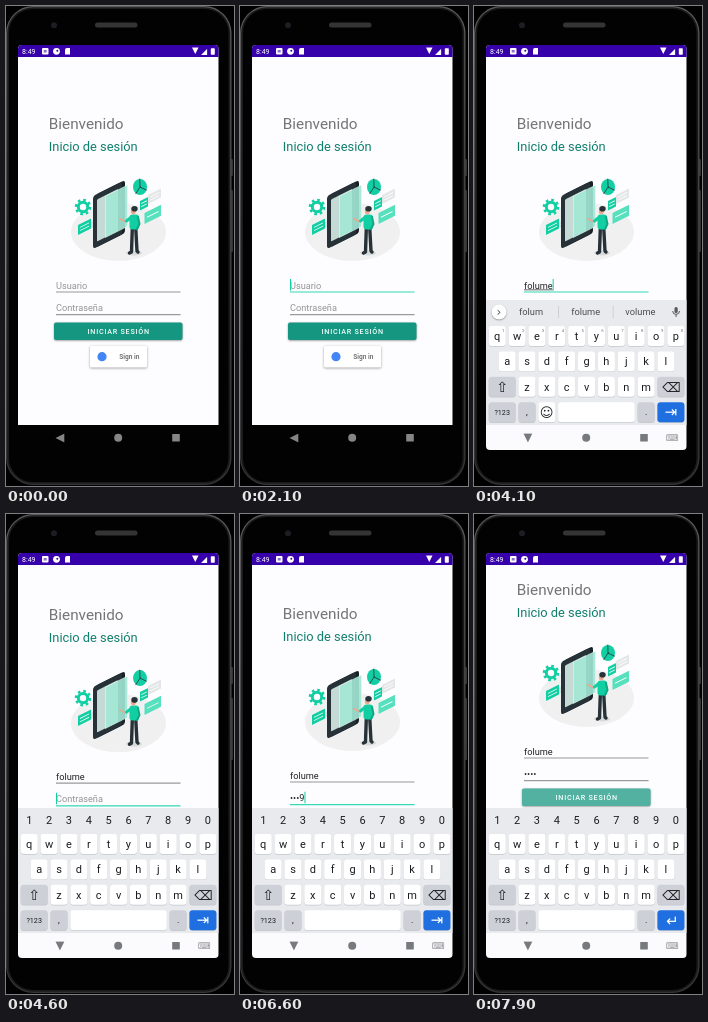
Recreate the animation shown at these times as an HTML page with a canvas. Size 228 px wide and 480 px high, loop 8000 ms.

```html
<!DOCTYPE html>
<html lang="es">
<head>
<meta charset="utf-8">
<title>Inicio de sesión</title>
<style>
html, body { margin: 0; width: 100%; height: 100%; overflow: hidden; background: #000; }
canvas { display: block; width: 100vw; height: 100vh; }
</style>
</head>
<body>
<canvas id="stage"></canvas>
<script>
const W = 228, H = 480, LOOP = 8000;
const canvas = document.getElementById('stage');
const ctx = canvas.getContext('2d');
const ratio = Math.max(1, window.devicePixelRatio || 1);
canvas.width = W * ratio;
canvas.height = H * ratio;

const TEAL = '#159680', MINT = '#12cfa3', PALE = '#d9f3ec', INK = '#263238', SKIN = '#e9a98d';
const KEY_INK = '#1b1d20', KEY_GREY = '#cdd1d7', KEY_BG = '#e8eaee', ICON = '#555a60';
const LEFT = 12, WIDTH = 200.7, STATUS_TOP = 39, APP_TOP = 51, NAV_TOP = 419, BOTTOM = 444;
const PITCH = 19.85, KEY_LEFT = 14.7, KEY_GAP = 2.8, KEYS_TOP = 294;
const USER = 'folume', PIN = '4789';

// Moments in ms
const FOCUS = 1700, SLIDE = 2500, NAV_SWAP = 3300, TYPE = 3400, TYPE_GAP = 115;
const NEXT = 4450, PIN_TYPE = 4950, PIN_GAP = 450, DONE = 6850;

const ease = v => 1 - (1 - Math.min(1, Math.max(0, v))) ** 3;
const typed = (t, start, gap, max) => Math.min(max, Math.max(0, Math.floor((t - start) / gap) + 1));
const userCount = t => typed(t, TYPE, TYPE_GAP, USER.length);
const pinCount = t => typed(t, PIN_TYPE, PIN_GAP, PIN.length);

function box(x, y, w, h, r, fill) {
  ctx.beginPath();
  ctx.roundRect(x, y, w, h, r);
  ctx.fillStyle = fill;
  ctx.fill();
}

function oval(x, y, rx, ry, fill) {
  ctx.beginPath();
  ctx.ellipse(x, y, rx, ry, 0, 0, 7);
  ctx.fillStyle = fill;
  ctx.fill();
}

function arc(x, y, r, color, width = 1, from = 0, to = 2 * Math.PI) {
  ctx.beginPath();
  ctx.arc(x, y, r, from, to);
  ctx.strokeStyle = color;
  ctx.lineWidth = width;
  ctx.stroke();
}

function limb(color, width, ...points) {
  ctx.beginPath();
  points.forEach(([x, y]) => ctx.lineTo(x, y));
  ctx.strokeStyle = color;
  ctx.lineWidth = width;
  ctx.lineCap = ctx.lineJoin = 'round';
  ctx.stroke();
}

function label(text, x, y, size, color, align = 'left', weight = 400, spacing = 0) {
  ctx.font = `${weight} ${size}px Roboto, sans-serif`;
  ctx.letterSpacing = spacing + 'px';
  ctx.textAlign = align;
  ctx.fillStyle = color;
  ctx.fillText(text, x, y);
  return ctx.measureText(text).width;
}

// Draws a symbol with its visible box centred on (x, y)
function glyph(symbol, x, y, size, color) {
  ctx.font = `${size}px "DejaVu Sans", sans-serif`;
  ctx.letterSpacing = '0px';
  ctx.textAlign = 'left';
  ctx.fillStyle = color;
  const m = ctx.measureText(symbol);
  ctx.fillText(symbol,
    x + (m.actualBoundingBoxLeft - m.actualBoundingBoxRight) / 2,
    y + (m.actualBoundingBoxAscent - m.actualBoundingBoxDescent) / 2);
}

function scoped(draw) {
  ctx.save();
  draw();
  ctx.restore();
}

function clipped(y, h, r, draw) {
  scoped(() => {
    ctx.beginPath();
    ctx.roundRect(LEFT, y, WIDTH, h, r);
    ctx.clip();
    draw();
  });
}

function shadowed(blur, draw) {
  scoped(() => {
    ctx.shadowColor = 'rgba(0,0,0,.4)';
    ctx.shadowBlur = blur * ratio;
    ctx.shadowOffsetY = ratio * .8;
    draw();
  });
}

// Upright isometric panel whose top edge rises to the right
function panel(x, y, w, h, fill, r = 0, rows = 0) {
  scoped(() => {
    ctx.transform(1, -.5, 0, 1, x, y);
    box(0, 0, w, h, r, fill);
    for (let i = 1; i <= rows; i++) box(w * .15, h * i / (rows + 1) - .4, w * .7, .8, 0, '#fff');
  });
}

function drawBody() {
  ctx.fillStyle = '#000';
  ctx.fillRect(0, 0, W, H);
  box(224, 153, 3, 17, 1, '#333');
  box(224, 184, 3, 62, 1, '#333');
  const rim = ctx.createLinearGradient(0, 0, 0, H);
  rim.addColorStop(0, '#5a5a5d');
  rim.addColorStop(1, '#343436');
  box(0, 0, 225.5, 479, 27, rim);
  box(1.2, 1.2, 223, 476.5, 26, '#1b1b1c');
  box(3, 3, 219.5, 473, 24, '#020202');
  box(89, 16.5, 42.5, 5, 2.5, '#343434');
  oval(48, 19.3, 3, 3, '#1d1d24');
}

function drawStatusBar() {
  box(LEFT, STATUS_TOP, WIDTH, APP_TOP - STATUS_TOP, 0, '#3600aa');
  label('8:49', 16, 48, 7, '#fff');
  box(36, 42, 6.5, 6.5, 1, '#fff');
  box(37.7, 44, 3, 2.5, 0, '#8c6fd0');
  oval(50.5, 45.3, 3.4, 3.4, '#fff');
  box(50.3, 43.7, 2, 2, 1, '#3600aa');
  box(59, 42, 5, 6.5, [2, 0, 0, 0], '#fff');
  glyph('▼', 189.5, 45.3, 8.5, '#fff');
  glyph('◢', 198.5, 45.3, 8, '#fff');
  box(204.8, 42.2, 4, 6.5, .7, '#fff');
}

function drawIllustration() {
  oval(112.5, 226, 47.5, 29, '#f0f0f1');

  arc(77, 201, 4.7, MINT, 3);
  scoped(() => {
    ctx.setLineDash([2.6, 2.9]);
    arc(77, 201, 7, MINT, 2.6);
  });
  panel(72, 219, 13, 10, MINT, .5, 2);
  panel(85, 216, 10, 6, '#d9dddd', .5, 1);

  panel(90, 188.5, 29, 53, '#172126', 3);
  panel(87, 190, 29, 53, INK, 3);
  panel(91, 193.5, 21, 42, '#c5d9d5', 1);
  panel(99, 190, 23, 42, 'rgba(255,255,255,.75)');
  panel(99.6, 190.2, 21.8, 41, 'rgba(120,222,196,.62)');

  oval(134, 181, 7, 8, MINT);
  for (const angle of [-1.6, .4, 2.2]) {
    limb(INK, .8, [134, 181], [134 + 7 * Math.cos(angle), 181 + 8 * Math.sin(angle)]);
  }
  panel(142, 189, 13, 9, '#e4e7e7', .5, 2);
  panel(134, 195, 8, 9.5, MINT, .5, 2);
  panel(138.5, 207, 16.5, 11, '#56e0bd', .5, 1);

  // Person
  oval(128, 247, 8, 2.5, '#d8dada');
  limb(INK, 3.4, [126.3, 223], [125.5, 246], [123.5, 247]);
  limb(INK, 3.4, [129.8, 223], [131, 245], [132, 246]);
  limb(SKIN, 1.6, [124, 213], [119, 215.5], [113.5, 212.5]);
  box(123.5, 208.5, 9.5, 15, 3, MINT);
  limb(MINT, 3, [125.5, 211], [120.5, 215]);
  limb('#0da985', 2, [132, 211], [133.5, 218], [131, 223]);
  oval(127.3, 205.2, 2.4, 3.3, SKIN);
  oval(128.5, 202.8, 3.2, 2.8, INK);
}

function drawField(y, text, hint, focused, composing, caret) {
  const width = label(text || hint, 50, y - 3.5, 9.2, text ? '#222' : '#959595');
  if (composing && text) box(50, y - 2.4, width, .7, 0, '#333');
  box(50, y - .6, 124.5, 1.2, 0, focused ? '#35d9b5' : '#9a9a9a');
  if (caret) box(50 + (text ? width : 0), y - 13, 1, 11.5, 0, MINT);
}

function pinText(t) {
  const count = pinCount(t);
  const reveal = count && t - PIN_TYPE - (count - 1) * PIN_GAP < 600;
  return '•'.repeat(reveal ? count - 1 : count) + (reveal ? PIN[count - 1] : '');
}

// The caret blinks once a second, counted from the latest keystroke or focus
function caretOn(t) {
  const lastUser = TYPE + (userCount(t) - 1) * TYPE_GAP;
  const lastPin = PIN_TYPE + (pinCount(t) - 1) * PIN_GAP;
  const since = [FOCUS, TYPE, NEXT, PIN_TYPE].findLast(moment => moment <= t) ?? t;
  const from = since === TYPE ? lastUser : since === PIN_TYPE ? lastPin : since;
  return (t - from) % 1000 < 500;
}

function drawForm(t) {
  const userFocus = t >= FOCUS && t < NEXT, pinFocus = t >= NEXT && t < DONE;
  const blink = caretOn(t);
  ctx.translate(0, -18 * ease((t - NEXT) / 250) - 24 * ease((t - DONE) / 250));
  label('Bienvenido', 42.8, 123, 15.3, '#757575');
  label('Inicio de sesión', 42.8, 144.8, 12.85, '#107f6d');
  drawIllustration();
  drawField(286, USER.slice(0, userCount(t)), 'Usuario', userFocus, userFocus, userFocus && blink);
  drawField(308.7, pinText(t), 'Contraseña', pinFocus, false, pinFocus && blink);

  shadowed(2, () => box(48, 316.5, 128.5, 17.5, 2, TEAL));
  if (t >= DONE) {
    const glow = .21 - .05 * Math.cos((t - DONE) / 330);
    box(48, 316.5, 128.5, 17.5, 2, `rgba(255,255,255,${glow})`);
  }
  label('INICIAR SESIÓN', 112.7, 327.8, 7.2, '#f2fffc', 'center', 500, .75);
  shadowed(2.5, () => box(84, 340, 57, 21.5, 1.5, '#fff'));
  oval(96, 350.7, 4.6, 4.6, '#4285f4');
  label('Sign in', 123.3, 353.2, 6.5, '#757575', 'center', 700);
}

// Places a key by column and row; draws its caption and returns its centre
function key(col, row, span = 1, text = '', fill = '#fff', size = 11) {
  const x = KEY_LEFT + col * PITCH, y = 320 + row * 25.4, w = span * PITCH - KEY_GAP;
  box(x, y + .7, w, 20, 3, '#c3c7cc');
  box(x, y, w, 20, 3, fill);
  label(text, x + w / 2, y + 10 + size * .34, size, KEY_INK, 'center');
  return [x + w / 2, y + 10];
}

function drawMic() {
  box(200.5, 301, 3.2, 6, 1.6, ICON);
  arc(202.1, 305, 3.4, ICON, 1, 0, Math.PI);
  box(201.6, 308.4, 1, 2.6, 0, ICON);
}

function drawToggle(symbol) {
  shadowed(1.5, () => oval(25, 306, 7.5, 7.5, '#fff'));
  glyph(symbol, 25, 306, 12, ICON);
}

function drawTools() {
  drawToggle('‹');
  box(37, KEYS_TOP + 1, 28, 23, 2, '#d8dbe0');
  [...'▤⚙●◪⋯'].forEach((symbol, i) => glyph(symbol, 51 + i * 29.3 + (i > 3 ? 5 : 0), 306, 12, ICON));
  for (let a = 3; a < 6; a++) oval(109.6 + 3 * Math.cos(a), 306 + 3 * Math.sin(a), .8, .8, KEY_BG);
  drawMic();
}

function drawSuggestions(count) {
  const words = [USER.slice(0, Math.max(1, count - 1)), USER.slice(0, count), 'volume'];
  drawToggle('›');
  words.forEach((word, i) => {
    label(word, 57 + i * 54.7, 309.3, 9.3, '#4a4e53', 'center');
    if (i) box(29.3 + i * 54.7, 300, .8, 12, 0, '#c5c9ce');
  });
  drawMic();
}

function drawNav(t, overKeyboard) {
  const swapped = overKeyboard && t >= NAV_SWAP;
  const color = swapped ? '#777a7d' : overKeyboard ? '#dcdcde' : '#858585';
  glyph(swapped ? '▼' : '◀', 54, 431.7, 11.5, color);
  oval(112.2, 431.7, 4, 4, color);
  box(166.2, 428, 7.6, 7.6, .6, color);
  if (overKeyboard) glyph('⌨', 198.5, 431.5, 9, swapped ? '#8b8e91' : '#e3e3e5');
}

function drawKeyboard(t) {
  const pinMode = t >= NEXT, count = userCount(t);
  box(LEFT, KEYS_TOP, WIDTH, NAV_TOP - KEYS_TOP, 0, KEY_BG);
  box(LEFT, NAV_TOP, WIDTH, BOTTOM - NAV_TOP, 0, '#fbfafc');

  if (!pinMode) count ? drawSuggestions(count) : drawTools();
  ['qwertyuiop', 'asdfghjkl', 'zxcvbnm'].forEach((letters, row) => {
    [...letters].forEach((char, i) => {
      const [x] = key(i + [0, .5, 1.5][row], row, 1, char);
      const digit = (i + 1) % 10;
      if (row === 0 && pinMode) label(digit, x, 310, 11, KEY_INK, 'center');
      else if (row === 0) label(digit, x + 7.3, 325.5, 4.3, '#6b6f74', 'right');
    });
  });
  glyph('⇧', ...key(0, 2, 1.5, '', KEY_GREY), 14, KEY_INK);
  glyph('⌫', ...key(8.5, 2, 1.5, '', KEY_GREY), 13, KEY_INK);
  key(0, 3, 1.5, '?123', KEY_GREY, 7.2);
  key(1.5, 3, 1, ',', KEY_GREY, 9);
  if (!pinMode) glyph('☺', ...key(2.5, 3), 13, KEY_INK);
  key(pinMode ? 2.5 : 3.5, 3, pinMode ? 5 : 4);
  key(7.5, 3, 1, '.', KEY_GREY, 9);
  glyph(t < DONE ? '⇥' : '↵', ...key(8.5, 3, 1.5, '', '#1f6fe0'), 15, '#fff');
  drawNav(t, true);
}

function render(t) {
  ctx.setTransform(ratio, 0, 0, ratio, 0, 0);
  drawBody();
  clipped(STATUS_TOP, BOTTOM - STATUS_TOP, 4, () => {
    box(LEFT, STATUS_TOP, WIDTH, NAV_TOP - STATUS_TOP, 0, '#fdfcfe');
    clipped(APP_TOP, NAV_TOP - APP_TOP, 0, () => drawForm(t));
    drawStatusBar();
    drawNav(t, false);
    if (t > SLIDE) {
      ctx.translate(0, (BOTTOM - KEYS_TOP) * (1 - ease((t - SLIDE) / 350)));
      drawKeyboard(t);
    }
  });
}

const start = performance.now();
function tick() {
  render((performance.now() - start) % LOOP);
  requestAnimationFrame(tick);
}
tick();
</script>
</body>
</html>
```
